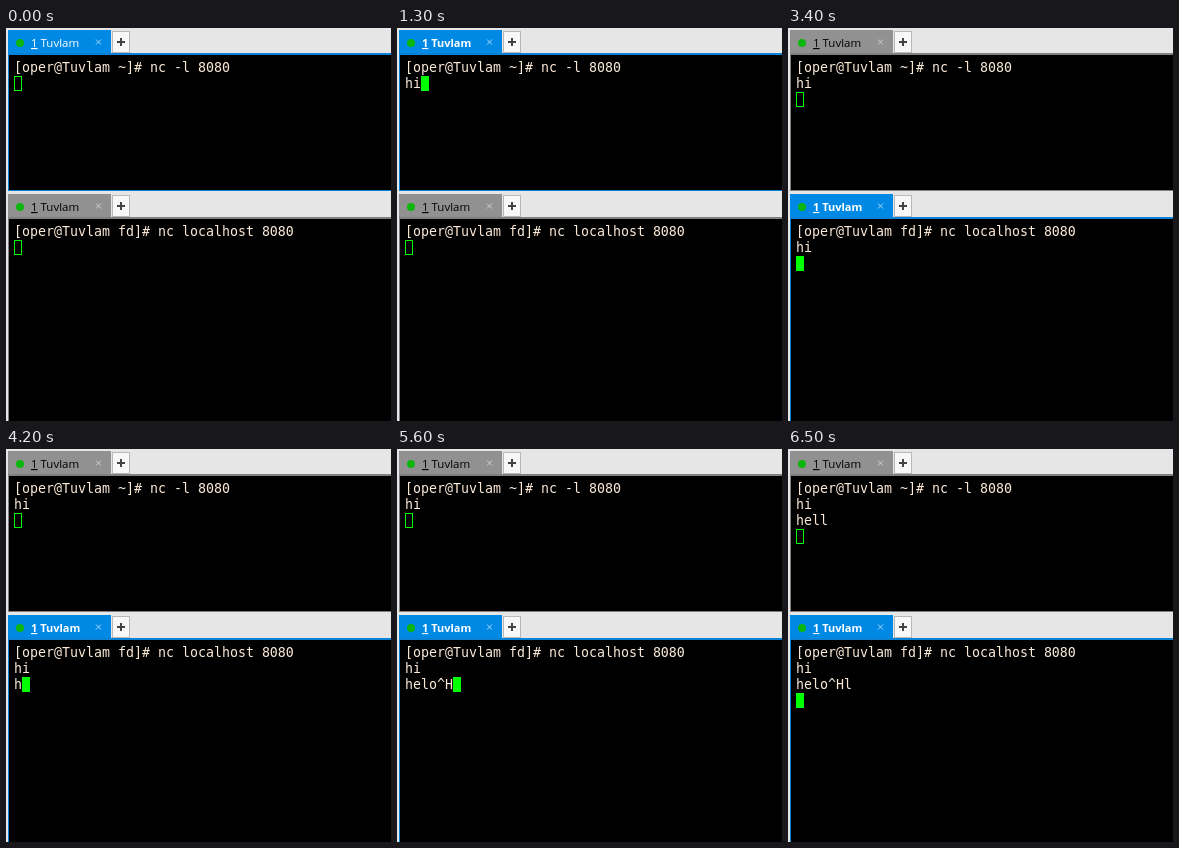
An HTML page that plays this animation: 385x393 px, repeating every 8 s.

```html
<!DOCTYPE html>
<html lang="en">
<head>
<meta charset="utf-8">
<title>Two terminals</title>
<style>
  html, body { margin: 0; width: 100%; height: 100%; overflow: hidden; background: #e6e6e6; }
  svg { display: block; width: 100%; height: 100%; }
  text { white-space: pre; }
  .term { font: 13.29px "DejaVu Sans Mono", monospace; fill: #fbe9d8; }
  .label { font: 11.5px "Open Sans", sans-serif; }
  .label.bold { font-weight: bold; font-size: 11px; }
</style>
</head>
<body>
<svg id="stage" viewBox="0 0 385 393"></svg>
<script>
const NS = "http://www.w3.org/2000/svg";
const LOOP = 8000, CELL = 8, LINE = 16, LEFT = 8, TOP = 32;
const BLUE = "#0089e4", GREY = "#919191", GREEN = "#00ff00";
const HOST = "Tuvlam", USER = "oper";

function add(parent, tag, attrs, content) {
  const el = document.createElementNS(NS, tag);
  set(el, attrs);
  if (content) el.textContent = content;
  parent.appendChild(el);
  return el;
}

function set(el, attrs) {
  for (const key in attrs) el.setAttribute(key, attrs[key]);
}

function rect(parent, x, y, width, height, fill) {
  return add(parent, "rect", { x, y, width, height, fill });
}

function makePane(y, height, prompt) {
  const g = add(document.getElementById("stage"), "g", { transform: `translate(0 ${y})` });
  const frame = rect(g, 2, 25, 383, height - 25, GREY);
  rect(g, 3, 27, 382, height - 28, "#000");
  const tab = rect(g, 2, 2, 103, 23, GREY);
  add(g, "circle", { cx: 14, cy: 15, r: 4, fill: "#0db60d" });

  const label = add(g, "text", { x: 25, y: 19 });
  add(label, "tspan", { "text-decoration": "underline" }, "1");
  add(label, "tspan", {}, " " + HOST);
  const close = add(g, "path", { d: "M90 11.5l5 5m0-5l-5 5", fill: "none" });

  add(g, "rect", { x: 106.5, y: 3.5, width: 17, height: 21, fill: "#f8f8f8", stroke: "#b8b8b8" });
  add(g, "path", { d: "M111 14h8M115 10v8", stroke: "#444", "stroke-width": 2 });

  const rows = [0, 1, 2].map(i =>
    add(g, "text", { class: "term", x: LEFT, y: TOP + i * LINE + 12 }));
  rows[0].textContent = prompt;
  const cursor = add(g, "rect", { stroke: GREEN });
  return { frame, tab, label, close, rows, cursor };
}

const panes = [
  makePane(0, 163, `[${USER}@${HOST} ~]# nc -l 8080`),
  makePane(164, 230, `[${USER}@${HOST} fd]# nc localhost 8080`)
];

// Each entry is [time, everything below the prompt].
const scripts = [
  [[0, ""], [1200, "h"], [1300, "hi"], [2100, "hi\n"], [6500, "hi\nhell\n"]],
  [[0, ""], [2100, "hi\n"], [4200, "hi\nh"], [4300, "hi\nhe"], [5000, "hi\nhel"],
   [5200, "hi\nhelo"], [5600, "hi\nhelo^H"], [5900, "hi\nhelo^Hl"], [6500, "hi\nhelo^Hl\n"]]
];

function textAt(script, t) {
  let text = "";
  for (const [start, value] of script) if (t >= start) text = value;
  return text;
}

function drawPane(pane, text, active, focused) {
  const lines = text.split("\n");
  for (let i = 1; i < pane.rows.length; i++) pane.rows[i].textContent = lines[i - 1] || "";

  const x = LEFT + lines[lines.length - 1].length * CELL;
  const y = TOP + lines.length * LINE;
  set(pane.cursor, {
    x: x + 0.5, y: y + 0.5, width: CELL - 1, height: LINE - 2,
    fill: focused ? GREEN : "none"
  });

  const tint = active ? BLUE : GREY;
  set(pane.frame, { fill: active ? "#0a82d6" : "#808080" });
  set(pane.tab, { fill: tint });
  set(pane.label, {
    class: focused ? "label bold" : "label",
    fill: active ? "#fff" : "#000"
  });
  set(pane.close, { stroke: active ? "#a8d8f8" : "#d0d0d0" });
}

function render(t) {
  const current = t < 3400 ? 0 : 1;
  panes.forEach((pane, i) =>
    drawPane(pane, textAt(scripts[i], t), i === current, i === current && t >= 400));
}

const begin = performance.now();
function tick() {
  render((performance.now() - begin) % LOOP);
  requestAnimationFrame(tick);
}
tick();
</script>
</body>
</html>
```
